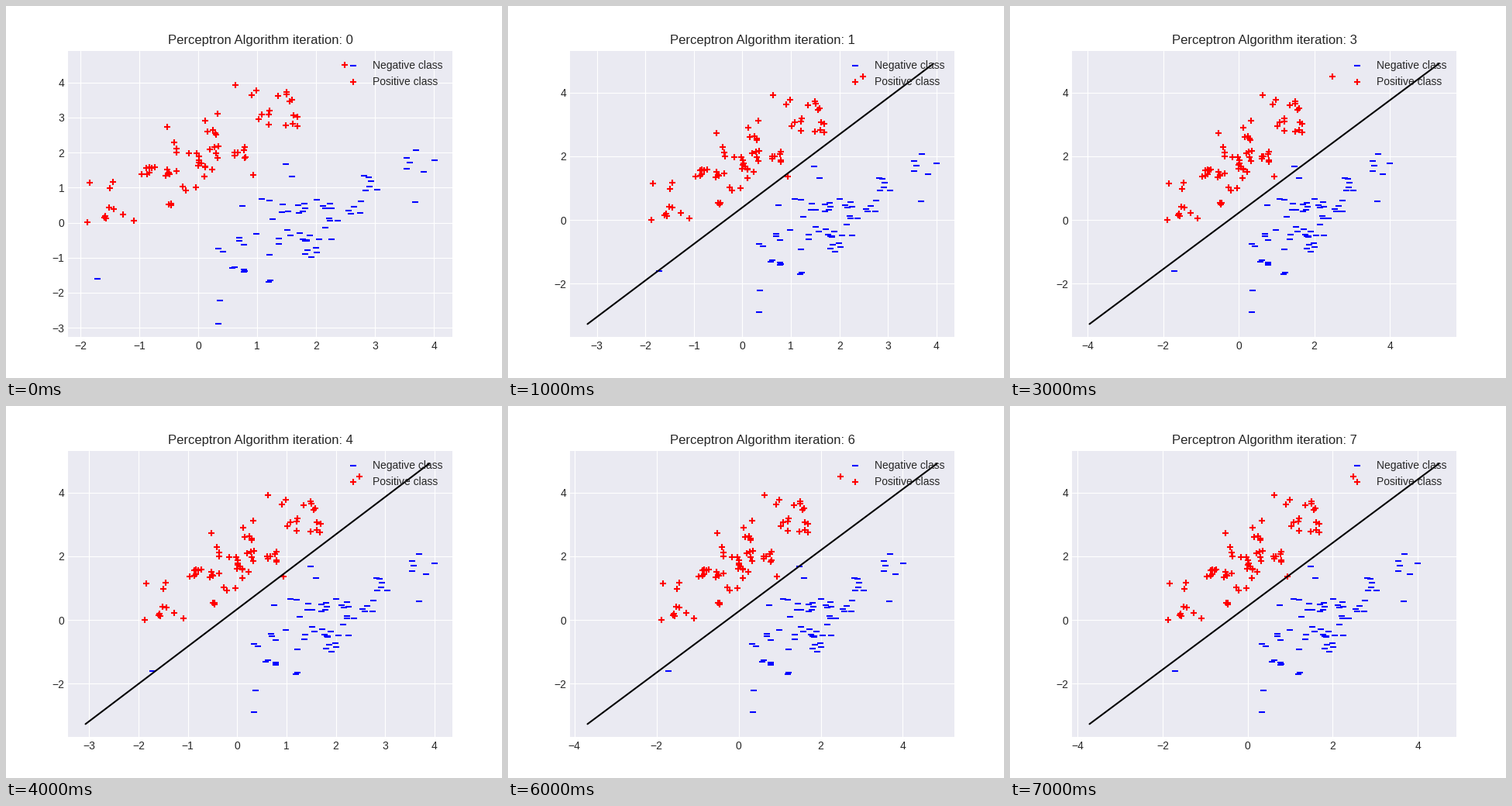
Animation, 640 px wide and 480 px high, one loop 8 s. Source, as a matplotlib script:

```python
import matplotlib.pyplot as plt
import numpy as np
from matplotlib.animation import FuncAnimation
from matplotlib.ticker import MultipleLocator

plt.rcParams.update({
    "font.family": "Liberation Sans",
    "text.color": "0.15",
    "xtick.color": "0.15",
    "ytick.color": "0.15",
    "axes.facecolor": "#EAEAF2",
    "axes.linewidth": 0,
    "axes.edgecolor": "white",
    "axes.axisbelow": True,
    "axes.grid": True,
    "grid.color": "white",
    "xtick.major.size": 0,
    "ytick.major.size": 0,
    "lines.solid_capstyle": "round",
    "legend.frameon": False,
})

# Opening view: data limits and the axes box in stage pixels (y down).
X_LIM, Y_LIM = (-2.21, 4.31), (-3.268, 4.91)
LEFT, RIGHT, TOP, BOTTOM = 80, 576, 57.6, 427.2

# Sample groups by size: centres in stage pixels of the opening view.
POSITIVE = {
    1: [(437, 76), (296, 102), (273, 139), (208, 156), (319, 218),
        (108, 228), (105, 279)],
    2: [(320, 112), (136, 231), (158, 273)],
    3: [(219, 183), (235, 235), (212, 256)],
    5: [(362, 117), (335, 143), (371, 149), (265, 160), (270, 187),
        (211, 215), (258, 213), (131, 268)],
    7: [(303, 190), (247, 198), (184, 212)],
}
NEGATIVE = {
    1: [(553, 199), (539, 214), (528, 253), (305, 258), (344, 275),
        (323, 294), (118, 352), (276, 380), (274, 410)],
    2: [(365, 212), (523, 191), (519, 206), (335, 250), (277, 315),
        (346, 314), (340, 355)],
    3: [(467, 222), (471, 236), (359, 262), (421, 276), (361, 295),
        (412, 296), (303, 303)],
    5: [(382, 261), (412, 257), (450, 262), (394, 318), (302, 340)],
    7: [(386, 300)],
}

# Boundary x at the bottom and top of the opening y range, per iteration.
BOUNDARY = [
    None, (-3.193, 3.935), (-4.541, 6.30), (-3.95, 5.30),
    (-3.075, 3.89), (-4.143, 5.80), (-3.68, 4.83), (-3.723, 4.50),
]


def samples(groups, rng):
    pts = []
    for size, centres in groups.items():
        reach = 10 if size > 1 else 0
        for centre in centres:
            offsets = rng.uniform(-reach, reach, (size, 2))
            # Keep each group balanced around its centre.
            pts.extend(centre + offsets - offsets.mean(axis=0))
    px, py = np.array(pts).T
    return (np.interp(px, (LEFT, RIGHT), X_LIM),
            np.interp(py, (TOP, BOTTOM), Y_LIM[::-1]))


def padded(low, high):
    pad = 0.05 * (high - low)
    return low - pad, high + pad


rng = np.random.default_rng(7)
fig, ax = plt.subplots(figsize=(6.4, 4.8), dpi=100)
neg, pos = samples(NEGATIVE, rng), samples(POSITIVE, rng)
ax.scatter(*neg, c="b", marker="_", label="Negative class")
ax.scatter(*pos, c="r", marker="+", label="Positive class")
line, = ax.plot([], [], "k-")
ax.legend(loc="upper right")
title = ax.set_title("")
x_min, x_max = pos[0].min(), neg[0].max()


def update(i):
    title.set_text(f"Perceptron Algorithm iteration: {i}")
    if i == 0:
        line.set_data([], [])
        x_lim, y_lim = X_LIM, Y_LIM
    else:
        ends = BOUNDARY[i]
        line.set_data(ends, Y_LIM)
        x_lim = padded(min(x_min, ends[0]), max(x_max, ends[1]))
        y_lim = padded(*Y_LIM)
    ax.set_xlim(x_lim)
    ax.set_ylim(y_lim)
    ax.xaxis.set_major_locator(MultipleLocator(
        1 if x_lim[1] - x_lim[0] < 9 else 2))
    ax.yaxis.set_major_locator(MultipleLocator(2 if i else 1))
    return line, title


anim = FuncAnimation(fig, update, frames=8, interval=1000, repeat=True)
plt.show()
```
